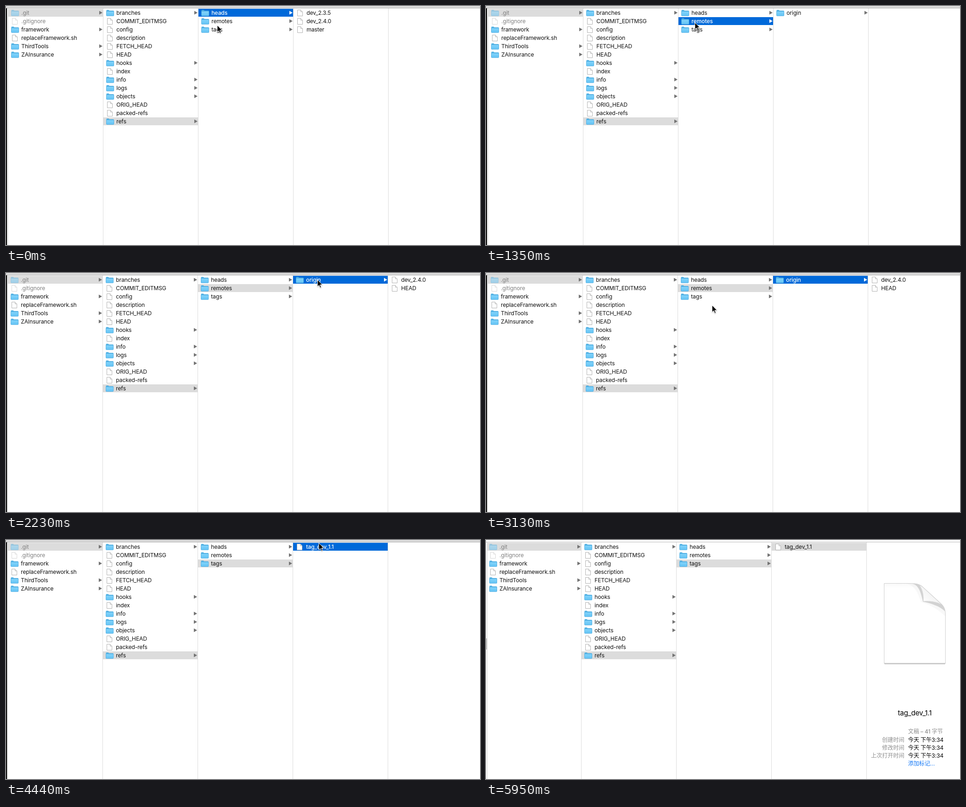
An HTML page for the animation above (6050 ms loop, 1022 by 515 pixels).

```html
<!DOCTYPE html>
<html lang="zh-CN">
<head>
<meta charset="utf-8">
<title>Column browser</title>
<style>
html, body { margin: 0; width: 100%; height: 100%; overflow: hidden; background: #fff; }
#stage { position: relative; width: 1022px; height: 515px; overflow: hidden; background: #fff;
  font: 12px/17px Inter, "Noto Sans CJK SC", "Noto Sans CJK", sans-serif; letter-spacing: -.12px; color: #111; }
#stage * { box-sizing: border-box; }
#bar { position: absolute; inset: 0 0 auto; height: 5px; background: #dcdcdc; border-bottom: 1px solid #a8a8a8; }
#edge { position: absolute; left: 0; top: 5px; width: 3px; height: 510px; background: #000; border-right: 1px solid #d4d4d4; }
#view { position: absolute; left: 3px; top: 5px; width: 1019px; height: 510px; overflow: hidden; }
#cols { position: absolute; left: 2px; top: 0; height: 510px; }
.col { position: absolute; top: 0; width: 205px; height: 510px; border-right: 1px solid #dcdcdc; }
.row { position: absolute; left: 0; width: 204px; height: 17px; white-space: pre; }
.row span { position: absolute; left: 28px; top: 0; }
.row svg { position: absolute; left: 6px; top: 1px; width: 18px; height: 16px; }
.row svg.tri { left: 196px; top: 4px; width: 7px; height: 9px; fill: #747474; }
.dim { color: #808080; }
.dim .icon { opacity: .5; }
.on { background: #dcdcdc; }
.hot { background: #0069d9; color: #fff; font-weight: 500; }
.hot .tri { fill: #fff !important; }
#info { position: absolute; left: 0; top: 0; }
#info div { position: absolute; white-space: pre; }
#info .name { left: 821px; width: 207px; top: 362px; text-align: center; font-size: 15px; line-height: 22px; color: #000; letter-spacing: -.15px; }
#info .key { right: -902px; color: #8e8e8e; font-weight: 500; letter-spacing: 0; }
#info .val { left: 910px; color: #000; }
#info .kind { color: #8e8e8e; font-weight: 500; }
#info .link { color: #1478f6; }
#info svg { position: absolute; left: 850px; top: 85px; }
#cursor { position: absolute; left: -2px; top: -2px; filter: drop-shadow(0 1px 1px rgba(0,0,0,.3)); }
.idle #bar { background: #fbfbfb; border-color: #bcbcbc; }
.idle #edge { background: linear-gradient(#c4c4c4, #c4c4c4) 0 207px / 2px 24px no-repeat #fff; }
.idle .soft { opacity: .2; }
.idle .crease { fill: #d2d2d2; }
</style>
</head>
<body>
<svg width="0" height="0" style="position:absolute">
  <defs>
    <linearGradient id="blue" x2="0" y2="1"><stop stop-color="#83d4fb"/><stop offset="1" stop-color="#63c3f4"/></linearGradient>
    <linearGradient id="shade" x1="0" y1="1" x2="1" y2="0"><stop stop-color="#fff"/><stop offset="1" stop-color="#bdbdbd"/></linearGradient>
    <linearGradient id="top" x2="0" y2="1"><stop stop-color="#e2e2e2"/><stop offset="1" stop-color="#fff"/></linearGradient>
    <linearGradient id="flap" x1="0" y1="1" x2="1" y2="0"><stop stop-color="#fff"/><stop offset="1" stop-color="#ebebeb"/></linearGradient>
  </defs>
  <symbol id="folder" viewBox="0 0 18 16">
    <path d="M.5 13V2.5q0-1 1-1H5.5l1.5 1.5H15.500q1 0 1 1V13z" fill="#4fb0e3"/>
    <path d="M.5 4.500H16.500V13.500q0 .8-.8 .8H1.300q-.8 0-.8-.8z" fill="url(#blue)" stroke="#51ade0" stroke-width=".8"/>
  </symbol>
  <symbol id="file" viewBox="0 0 18 16">
    <path d="M2.500 1.500H9.500L13.500 5.500V14.500H2.500z" fill="#fff" stroke="#b3b3b3"/>
    <path d="M9.500 1.500V5.500H13.500" fill="#f2f2f2" stroke="#b3b3b3"/>
  </symbol>
  <symbol id="tri" viewBox="0 0 7 9"><path d="M0 .5L7 4.500L0 8.500z"/></symbol>
</svg>
<div id="stage">
  <div id="view"><div id="cols"></div></div>
  <div id="bar"></div>
  <div id="edge"></div>
  <div id="info">
    <svg width="150" height="190" viewBox="850 85 150 190">
      <path d="M859 264H990V268H859z" fill="#bdbdbd" opacity=".7"/>
      <path d="M858.500 93.500H916C932 93.500 938 97 945 104L980 136C987 142 990.500 149 990.500 160V265.500H858.500z" fill="#fff" stroke="#d0d0d0"/>
      <path class="soft" d="M859 94H916C928 94 934 97 939 104H859z" fill="url(#top)"/>
      <path class="soft" d="M906 94C924 97 931 113 938 134C958 139 976 151 990 164V160C990 149 987 142 980 136L945 104C938 97 932 94 916 94z" fill="url(#shade)"/>
      <path class="crease" d="M919 94C933 97 938 113 942 133C958 136 978 142 990 154C989 146 985 140 978 134L945 104C938 97 932 94 919 94z" fill="#dedede"/>
      <path d="M935 98C942 108 944 120 943 132C955 131 968 132 981 138L945 105C941 101 938 99 935 98z" fill="url(#flap)" stroke="#e0e0e0" stroke-width=".7"/>
      <path d="M858 265.500H991" stroke="#c2c2c2"/>
    </svg>
    <div class="name">tag_dev_1.1</div>
    <div class="val kind" style="top:404px">文稿 – 41 字节</div>
    <div class="key" style="top:422px">创建时间</div><div class="val" style="top:422px">今天 下午3:34</div>
    <div class="key" style="top:439px">修改时间</div><div class="val" style="top:439px">今天 下午3:34</div>
    <div class="key" style="top:456px">上次打开时间</div><div class="val" style="top:456px">今天 下午3:34</div>
    <div class="val link" style="top:473px">添加标记…</div>
  </div>
  <svg id="cursor" width="18" height="24" viewBox="-2 -2 18 24">
    <path d="M.5 .5V15.500L4 12.300L6.300 17.700L8.600 16.700L6.300 11.400H11z" fill="#000" stroke="#fff"/>
  </svg>
</div>
<script>
const LOOP = 6050;
const $ = id => document.getElementById(id);

// A trailing slash marks a folder.
const tree = {
  root: '.git/ .gitignore framework/ replaceFramework.sh ThirdTools/ ZAInsurance/',
  '.git': 'branches/ COMMIT_EDITMSG config description FETCH_HEAD HEAD hooks/ index info/ logs/ objects/ ORIG_HEAD packed-refs refs/',
  refs: 'heads/ remotes/ tags/',
  heads: 'dev_2.3.5 dev_2.4.0 master',
  remotes: 'origin/',
  origin: 'dev_2.4.0 HEAD',
  tags: 'tag_dev_1.1'
};

// Start time, selection below refs, scroll offset
const scenes = [
  [0, ['heads'], 0],
  [1350, ['remotes'], 0],
  [2230, ['remotes', 'origin'], 1],
  [3570, ['tags'], 1],
  [4440, ['tags', 'tag_dev_1.1'], 1],
  [4590, ['tags', 'tag_dev_1.1'], 4],
  [5950, ['tags', 'tag_dev_1.1'], 4]
];

// Start, end, steps, then first, control and last point
const moves = [
  [0, 0, 1, [455, 41], [455, 41], [455, 41]],
  [150, 150, 1, [451, 36], [451, 36], [451, 36]],
  [750, 750, 1, [450, 35], [450, 35], [450, 35]],
  [1490, 2230, 5, [470, 36], [600, 36], [671, 14]],
  [2680, 3570, 6, [655, 30], [500, 106], [460, 48]],
  [3860, 4440, 4, [472, 46], [610, 30], [674, 6]],
  [4590, 5040, 3, [678, 16], [650, 30], [886, 359]]
];

const use = (id, cls) => `<svg class="${cls}"><use href="#${id}"/></svg>`;
const latest = (list, t) => list.filter(item => item[0] <= t).pop();

function rowHtml(entry, i, mark) {
  const folder = entry.endsWith('/');
  const name = entry.replace('/', '');
  const dim = name[0] === '.' ? 'dim' : '';
  return `<div class="row ${dim} ${mark(name)}" style="top:${1 + 18 * i}px">` +
    use(folder ? 'folder' : 'file', 'icon') + `<span>${name}</span>` +
    (folder ? use('tri', 'tri') : '') + '</div>';
}

function drawScene([start, picked, shift]) {
  const path = ['.git', 'refs', ...picked];
  const idle = start === 5950;
  let html = `<div class="col" style="left:-205px"></div>`;
  for (let c = 0; c < 5; c++) {
    const list = tree[c ? path[c - 1] : 'root'];
    const mark = name => name !== path[c] ? '' :
      c === path.length - 1 && !idle ? 'hot' : 'on';
    const rows = list ? list.split(' ').map((e, i) => rowHtml(e, i, mark)).join('') : '';
    html += `<div class="col" style="left:${c * 205}px">${rows}</div>`;
  }
  $('cols').innerHTML = html;
  $('cols').style.transform = `translateX(${-shift}px)`;
  $('info').style.display = start >= 4590 ? '' : 'none';
  $('stage').className = idle ? 'idle' : '';
}

function placeCursor(t) {
  const [from, to, steps, a, b, c] = latest(moves, t);
  const k = to > from ? Math.min(1, Math.floor((t - from) / (to - from) * steps + .02) / steps) : 1;
  const p = k * (2 - k), q = 1 - p;
  const [x, y] = [0, 1].map(i => Math.round(q * q * a[i] + 2 * p * q * b[i] + p * p * c[i]));
  $('cursor').style.transform = `translate(${x}px, ${y}px)`;
  $('cursor').style.display = t < 5190 ? '' : 'none';
}

let shown;
const origin = performance.now();
function tick() {
  const t = Math.max(0, performance.now() - origin) % LOOP;
  const scene = latest(scenes, t);
  if (scene !== shown) drawScene(shown = scene);
  placeCursor(t);
  requestAnimationFrame(tick);
}
tick();
</script>
</body>
</html>
```
